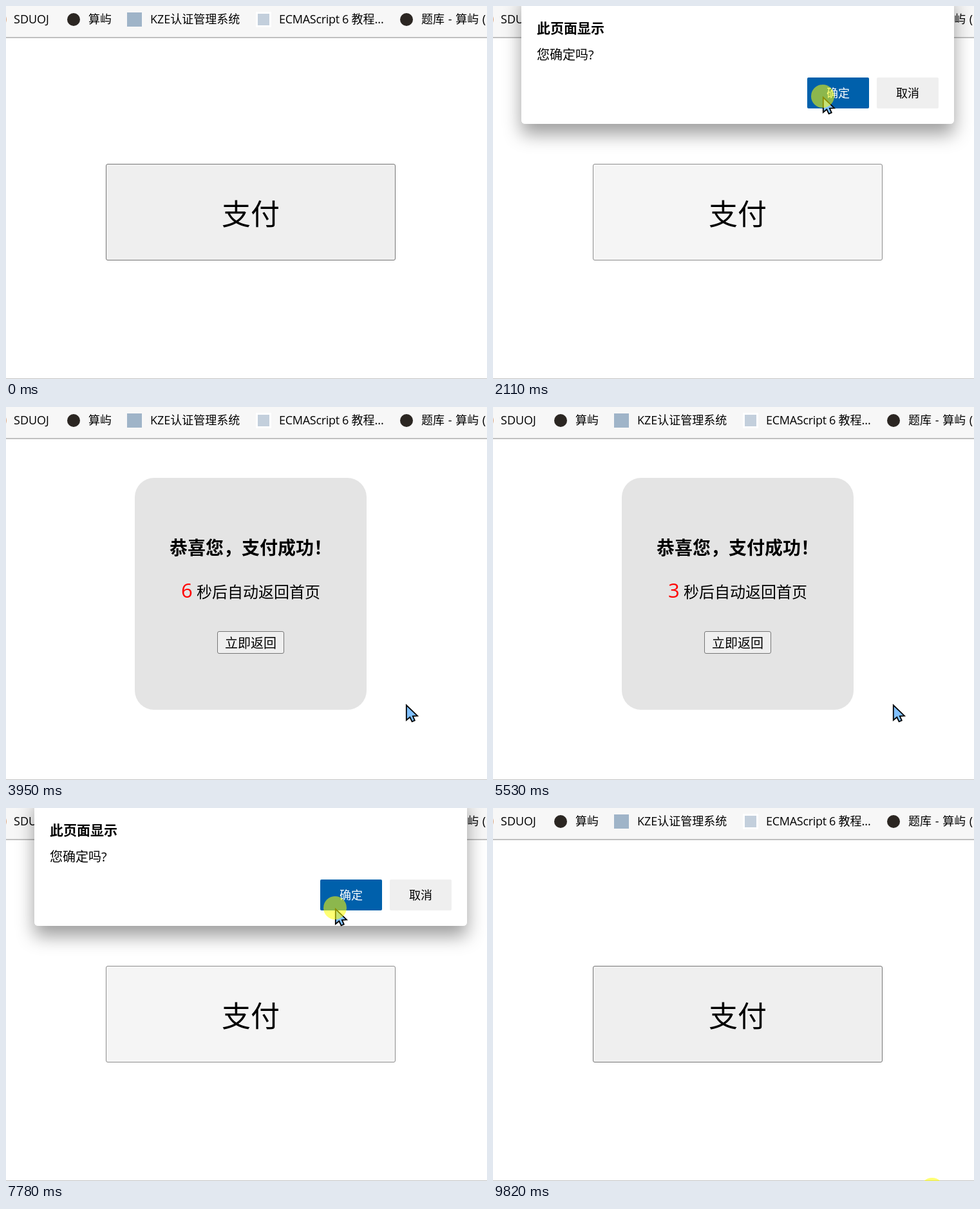
An HTML page for the animation above (9880 ms loop, 747 by 579 pixels).

```html
<!DOCTYPE html>
<html lang="zh-CN">
<head>
<meta charset="utf-8">
<title>支付</title>
<style>
  html, body { margin: 0; width: 100%; height: 100%; overflow: hidden; background: #fff; }
  svg { display: block; width: 747px; height: 579px; }
  text { font-family: "Open Sans", "Noto Sans CJK SC", sans-serif; font-size: 18px; white-space: pre; }
  .mid { text-anchor: middle; }
  .button rect { fill: #efefef; stroke: #767676; }
  .button.hover rect { fill: #e5e5e5; stroke: #4f4f4f; }
  .button.active rect { fill: #f5f5f5; stroke: #8d8d8d; }
  #ok rect { fill: #0067b8; }
  #ok.hover rect { fill: #0060ab; }
</style>
</head>
<body>
<svg viewBox="0 0 747 579">
  <defs>
    <filter id="shadow" x="-10%" y="-10%" width="120%" height="160%">
      <feDropShadow dx="0" dy="16" stdDeviation="14" flood-opacity=".38"/>
    </filter>
  </defs>
  <rect width="747" height="579" fill="#fff"/>

  <g id="bookmarks">
    <rect width="747" height="48" fill="#f7f7f7"/>
    <rect y="48" width="747" height="2" fill="#c0c0c0"/>
    <circle cx="-10" cy="21" r="11" fill="#dca57c"/>
    <text x="12" y="27">SDUOJ</text>
    <circle cx="105" cy="21" r="10" fill="#2b2622"/>
    <text x="128" y="27">算屿</text>
    <rect x="188" y="10" width="23" height="22" fill="#9fb4c8"/>
    <text x="224" y="27">KZE认证管理系统</text>
    <rect x="388" y="9" width="24" height="24" fill="#fff"/>
    <rect x="391" y="12" width="18" height="18" fill="#c3cfdc"/>
    <text x="424" y="27"><tspan letter-spacing="-.3">ECMAScript 6 </tspan>教程...</text>
    <circle cx="622" cy="21" r="10" fill="#2b2622"/>
    <text x="645" y="27" word-spacing="1">题库 - 算屿 (L</text>
  </g>
  <rect y="578" width="747" height="1" fill="#c4c4c4"/>

  <g id="home">
    <g id="pay" class="button">
      <rect x="155.5" y="245.5" width="449" height="149" rx="2.5"/>
      <text class="mid" x="380" y="339.5" style="font-size:45px">支付</text>
    </g>
  </g>

  <g id="result">
    <rect x="200" y="110" width="360" height="360" rx="30" fill="#e4e4e4"/>
    <text class="mid" x="380" y="229" style="font-size:28px;font-weight:700">恭喜您，支付成功！</text>
    <text class="mid" x="380" y="296" style="font-size:24px"><tspan id="count" fill="#f00" style="font-size:31px">10</tspan> 秒后自动返回首页</text>
    <g id="back" class="button">
      <rect x="328.5" y="348.5" width="103" height="34" rx="2.5"/>
      <text class="mid" x="380" y="374" style="font-size:20px">立即返回</text>
    </g>
  </g>

  <g id="dialog">
    <rect x="44" y="-20" width="672" height="203" rx="6" fill="#fff" filter="url(#shadow)"/>
    <text x="68" y="42" style="font-size:21px;font-weight:700">此页面显示</text>
    <text x="68" y="83" style="font-size:20px">您确定吗?</text>
    <g id="ok">
      <rect x="488" y="111" width="96" height="48" rx="2"/>
      <text class="mid" x="536" y="141.5" fill="#fff">确定</text>
    </g>
    <rect x="596" y="111" width="96" height="48" rx="2" fill="#efefef"/>
    <text class="mid" x="644" y="141.5">取消</text>
  </g>

  <g id="cursor">
    <path d="M.8 1.8V25L6.3 20.5L9.6 27.3L13.8 25.6L10.8 18.8L18 18.4Z" fill="#80c0ff" stroke="#000" stroke-width="1.8"/>
    <circle id="halo" r="18" fill="#ff0" opacity=".55"/>
  </g>
</svg>
<script>
const LOOP = 9880, HOLD = 200, FADE = 140;
const SECONDS = 10, TICK = 398, TICK_DELAY = 40;

// each step glides the pointer to a point; a press there opens the next scene on release
const steps = [
  { leave: 260, arrive: 890, x: 413, y: 278, press: 950, next: "dialog" },
  { leave: 1500, arrive: 2110, x: 512, y: 140, press: 2110, next: "result" },
  { leave: 2310, arrive: 3130, x: 621, y: 461 },
  { leave: 6330, arrive: 6820, x: 425, y: 355, press: 6920, next: "dialog" },
  { leave: 7360, arrive: 7780, x: 511, y: 155, press: 7780, next: "result" },
  { leave: 7980, arrive: 8340, x: 412, y: 348, press: 8600, next: "home" },
  { leave: 9080, arrive: 9430, x: 682, y: 592, press: 9820, next: "home" }
];
const clicks = steps.filter(step => step.press);

const $ = id => document.getElementById(id);
const show = (id, on) => $(id).setAttribute("display", on ? "inline" : "none");
const clamp = v => Math.min(1, Math.max(0, v));
const ease = k => k * k * (3 - 2 * k);

function pointerAt(t) {
  let { x, y } = steps.at(-1);
  for (const step of steps) {
    const k = ease(clamp((t - step.leave) / (step.arrive - step.leave)));
    x += (step.x - x) * k;
    y += (step.y - y) * k;
  }
  return { x, y };
}

function sceneAt(t) {
  const click = clicks.findLast(({ press }) => t >= press + HOLD);
  if (!click) return { name: "home", age: t };
  const age = t - click.press - HOLD;
  const left = SECONDS - Math.max(0, Math.floor((age - TICK_DELAY) / TICK));
  return { name: click.next === "result" && left < 1 ? "home" : click.next, age, left };
}

function isOver(id, { x, y }) {
  const box = $(id).querySelector("rect").getAttribute.bind($(id).querySelector("rect"));
  const dx = x - box("x"), dy = y - box("y");
  return dx >= 0 && dy >= 0 && dx <= box("width") && dy <= box("height");
}

function draw(t) {
  const pointer = pointerAt(t);
  const { name, age, left } = sceneAt(t);
  const pressed = clicks.some(({ press }) => t >= press && t < press + HOLD);

  show("home", name !== "result");
  show("result", name === "result");
  show("dialog", name === "dialog");
  show("halo", pressed);
  if (name === "result") $("count").textContent = left;
  $("dialog").setAttribute("opacity", clamp(.3 + age / FADE));

  for (const id of ["pay", "back", "ok"]) {
    const over = isOver(id, pointer);
    $(id).classList.toggle("hover", over);
    $(id).classList.toggle("active", over && pressed || name === "dialog");
  }
  $("cursor").setAttribute("transform", `translate(${pointer.x} ${pointer.y})`);
}

const start = performance.now();
function frame() {
  draw((performance.now() - start) % LOOP);
  requestAnimationFrame(frame);
}
frame();
</script>
</body>
</html>
```
